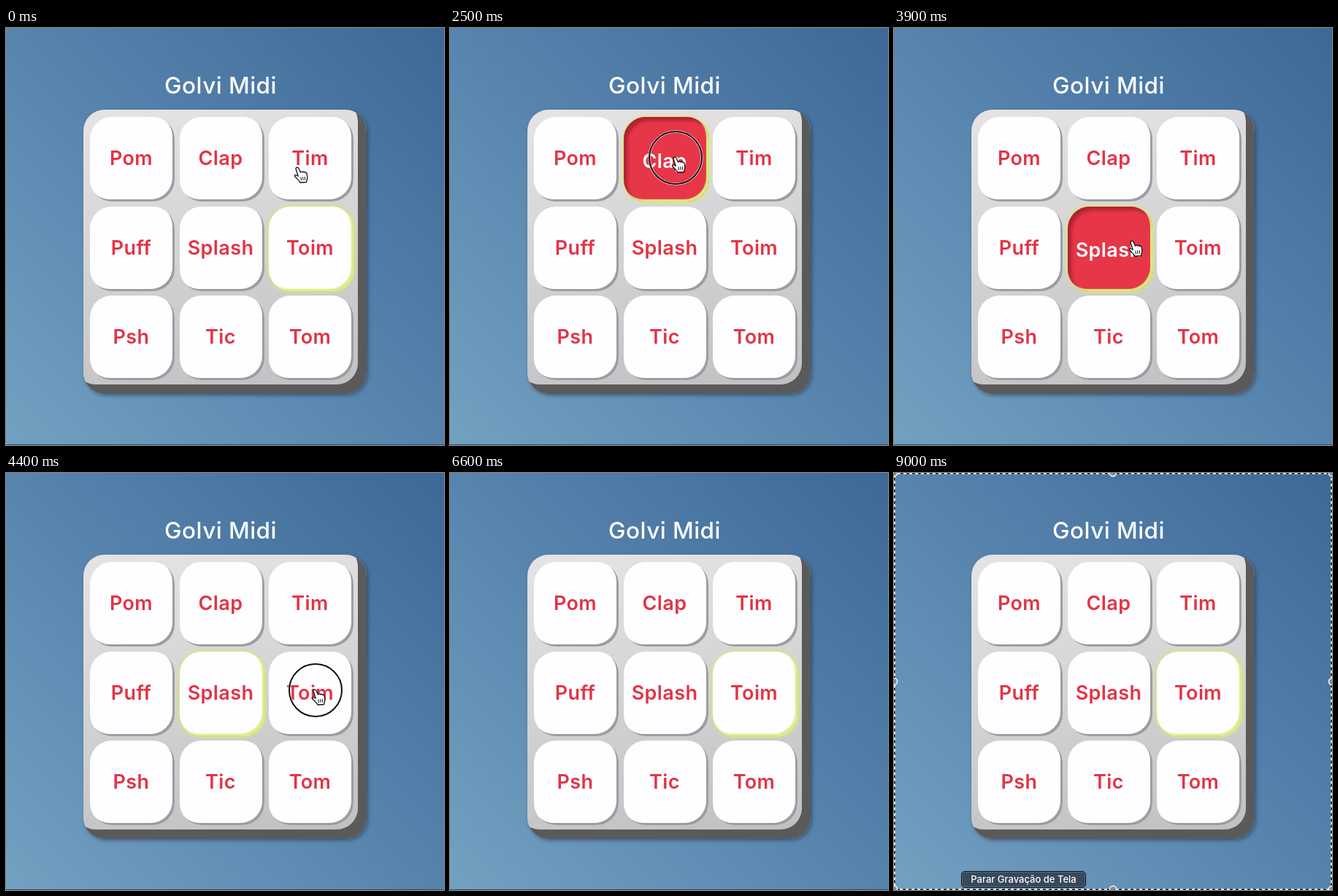
Write an HTML page that moves like this. It is 600 px wide and 572 px high and loops after 9.1 s.

```html
<!DOCTYPE html>
<html lang="pt-BR">
<head>
<meta charset="utf-8">
<title>Golvi Midi</title>
<style>
  html, body { margin: 0; width: 100%; height: 100%; overflow: hidden; }
  #stage {
    position: relative; width: 600px; height: 572px; overflow: hidden;
    background: linear-gradient(45deg, #73a1c1, #5885ae 48%, #3d6897);
    font-family: Inter, "Open Sans", sans-serif;
  }
  #stage::after {
    content: ""; position: absolute; left: 0; right: 0; bottom: 0;
    height: 1px; background: #2f4b66;
  }
  h1 {
    position: absolute; left: 0; top: 58.5px; width: 588px; margin: 0;
    font-size: 31.5px; line-height: 40px; font-weight: 500;
    letter-spacing: .45px; text-align: center; color: #fff;
  }
  #panel {
    position: absolute; left: 106px; top: 112px; width: 388px; height: 390px;
    border-radius: 29px;
    background: linear-gradient(170deg, #e6e3e5, #d3d2d3 50%, #bfbec1);
    box-shadow: inset -12px -13px 0 #5a5a5b, 2px 2px 5px rgba(20, 40, 65, .5);
  }
  .key {
    position: absolute; width: 116px; height: 116px; box-sizing: border-box;
    padding: 0 3px 3px 0; border-radius: 30px;
    background: #fefdff; color: #e23446;
    display: flex; align-items: center; justify-content: center;
    font-size: 27px; font-weight: 600; letter-spacing: .4px;
    box-shadow: inset -3px -3px 0 #9d9da1;
  }
  .key.focus {
    box-shadow: inset -3px -3px 2px #dcea80, 0 0 4px 1.5px #d8e874;
  }
  .key.down {
    padding-top: 7px; background: #e63648; color: #fff;
    box-shadow: inset -3px -3px 1px #dcea80, inset 5px 5px 4px rgba(110, 10, 25, .45),
      0 0 4px 1.5px #d8e874;
  }
  svg { position: absolute; left: 0; top: 0; z-index: 1; }
  #tip {
    position: absolute; left: 92px; top: 546px; width: 171px; height: 23px;
    box-sizing: border-box; z-index: 2; border: 1.5px solid #0c1116;
    border-radius: 5px; background: #37495a;
    box-shadow: inset 0 0 0 1px #5d6d7c;
    color: #fff; font-size: 13px; font-weight: 500; line-height: 20px;
    text-align: center; white-space: nowrap;
  }
</style>
</head>
<body>
<div id="stage">
  <h1>Golvi Midi</h1>
  <div id="panel"></div>
  <svg width="600" height="572" viewBox="0 0 600 572">
    <g id="select">
      <g fill="none" stroke-width="1.6">
        <rect x=".8" y=".8" width="598.4" height="570.4" stroke="#fff"/>
        <rect x=".8" y=".8" width="598.4" height="570.4" stroke="#111" stroke-dasharray="4"/>
      </g>
      <g id="grips" fill="#85898e" stroke="#fff" stroke-width="1.4"></g>
    </g>
    <g id="pointer">
      <g id="ring" fill="none">
        <circle r="36" stroke="#fff" stroke-width="3.6" stroke-opacity=".75"/>
        <circle r="36" stroke="#111" stroke-width="2"/>
      </g>
      <g id="hand" stroke="#111" stroke-width="1.3" stroke-linejoin="round">
        <path fill="#fff" d="M-3 1C-3-1 0-1.5 1 .5L3.5 6C4 4.5 6 4.5 6.8 6 7.5 4.8 9 5 9.7 6.6 10.6 5.8 12 6.3 12.2 8L12.8 13C13 16 11.5 17 11.5 19.5L3 20C2 17.5-1 15.5-4.2 11.8-5.5 10-3.5 9-2 10L.2 11.2Z"/>
        <path fill="none" stroke-width="1" d="M3.8 12.5l.7 4.5M6.6 12.2l.5 4.6M9.3 12l.3 4.6"/>
      </g>
      <path id="arrow" fill="#111" stroke="#fff" stroke-width="1.2" d="M0 0V16L3.7 12.6 6 18 8.6 16.9 6.3 11.6H11.3Z"/>
    </g>
  </svg>
  <div id="tip">Parar Gravação de Tela</div>
</div>
<script>
const LOOP = 9100, STEP = 100;
const SELECT_AT = 6800, TIP_AT = 8600;
const RING = 200, PRESS_DELAY = 100, DWELL = 300;
const LEFT = 115, TOP = 122, PITCH = 122.5;
const labels = ["Pom", "Clap", "Tim", "Puff", "Splash", "Toim", "Psh", "Tic", "Tom"];

const enter = { at: 0, x: 400, y: 192 };
const exit = { at: 5100, x: 558, y: 328 };
const clicks = [
  { at: 1000, x: 424, y: 420 },
  { at: 1700, x: 331, y: 420 },
  { at: 2400, x: 309, y: 178 },
  { at: 3000, x: 184, y: 298 },
  { at: 3700, x: 327, y: 293 },
  { at: 4400, x: 424, y: 298 }
];
const stops = [enter, ...clicks, exit];

const holds = [[100, 1700], [1700, 1900], [2100, 2300]];

const $ = id => document.getElementById(id);
const show = (el, on) => { el.style.display = on ? "" : "none"; };
const ease = k => k * k * (3 - 2 * k);
const keyUnder = p =>
  Math.floor((p.x - LEFT) / PITCH) + 3 * Math.floor((p.y - TOP) / PITCH);

const keys = labels.map((label, i) => {
  const key = document.createElement("div");
  key.textContent = label;
  key.style.left = LEFT + (i % 3) * PITCH + "px";
  key.style.top = TOP + Math.floor(i / 3) * PITCH + "px";
  $("stage").insertBefore(key, document.querySelector("svg"));
  return key;
});

for (const x of [0, 300, 600])
  for (const y of [0, 286, 571]) {
    if (x === 300 && y === 286) continue;
    const grip = document.createElementNS("http://www.w3.org/2000/svg", "circle");
    grip.setAttribute("cx", x);
    grip.setAttribute("cy", y);
    grip.setAttribute("r", 4.5);
    $("grips").append(grip);
  }

function pointerAt(t) {
  const next = stops.find(s => s.at > t) || exit;
  const prev = stops[stops.indexOf(next) - 1];
  const leave = prev === enter ? 0 : prev.at + DWELL;
  const k = ease(Math.min(1, Math.max(0, (t - leave) / (next.at - leave))));
  return [prev.x + (next.x - prev.x) * k, prev.y + (next.y - prev.y) * k];
}

function draw(time) {
  let t = Math.floor((time % LOOP) / STEP) * STEP;
  const hold = holds.find(([a, b]) => t >= a && t < b);
  if (hold) t = hold[0];

  // The last pressed key keeps the focus, also across the loop.
  const last = clicks.findLast(c => c.at + PRESS_DELAY <= t);
  const focus = keyUnder(last || clicks[clicks.length - 1]);
  const down = last && t < last.at + DWELL;
  keys.forEach((key, i) => {
    key.className = "key" + (i === focus ? (down ? " down" : " focus") : "");
  });

  const [x, y] = pointerAt(t);
  $("pointer").setAttribute("transform", `translate(${x} ${y})`);
  show($("pointer"), t <= exit.at);
  show($("ring"), clicks.some(c => t >= c.at && t < c.at + RING));
  show($("hand"), x < 476);
  show($("arrow"), x >= 476);
  show($("select"), t >= SELECT_AT);
  show($("tip"), t >= TIP_AT);
}

const start = performance.now();
function tick() {
  draw(performance.now() - start);
  requestAnimationFrame(tick);
}
tick();
</script>
</body>
</html>
```
